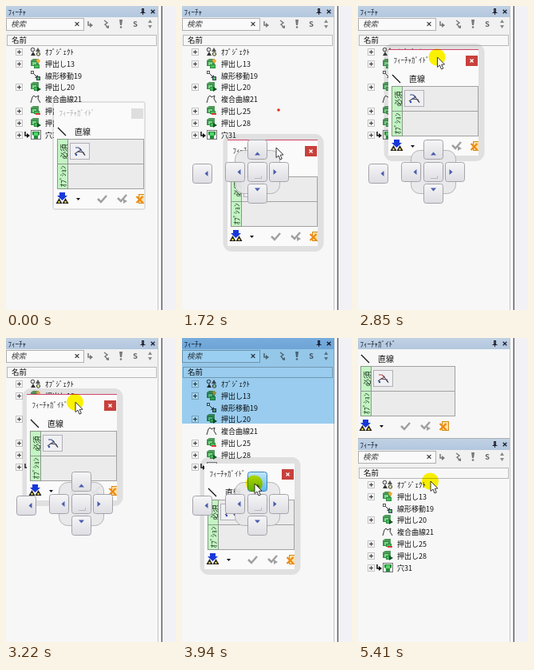
Write an HTML page with a canvas that moves like this. It is 213 px wide and 380 px high and loops after 7.17 s.

```html
<!DOCTYPE html>
<html lang="ja">
<head>
<meta charset="utf-8">
<title>フィーチャガイド</title>
<style>
html, body { margin: 0; width: 100%; height: 100%; overflow: hidden; background: #fff; }
canvas { display: block; width: 100vw; height: 100vh; }
</style>
</head>
<body>
<canvas id="stage"></canvas>
<script>
const W = 213, H = 380, LOOP = 7170;
const FONT = '"Noto Sans CJK JP", "Noto Sans CJK", sans-serif';
const PANEL = '#f7f7f7';
const canvas = document.getElementById('stage');
const c = canvas.getContext('2d');

// Pointer path: time, x, y
const POINTER = [
  [430, 222, 206], [700, 178, 166], [950, 136, 138], [1090, 122.5, 131], [1150, 121.5, 130],
  [1420, 121.5, 130], [1720, 118, 177], [2140, 118, 177], [2230, 115, 130], [2400, 115, 130],
  [2610, 111, 85], [2780, 104, 63], [3000, 90, 66], [3130, 86, 74], [3220, 87, 80],
  [3500, 88, 122], [3820, 90, 174], [3850, 90, 174], [3940, 91, 182], [5320, 91, 182], [5410, 91, 179]
];

function along(keys, t) {
  if (t <= keys[0][0]) return keys[0].slice(1);
  for (let i = 1; i < keys.length; i++) {
    const [t0, x0, y0] = keys[i - 1], [t1, x1, y1] = keys[i];
    if (t <= t1) {
      const k = (t - t0) / (t1 - t0);
      return [x0 + (x1 - x0) * k, y0 + (y1 - y0) * k];
    }
  }
  return keys[keys.length - 1].slice(1);
}

function box(x, y, w, h, fill, edge) {
  if (fill) { c.fillStyle = fill; c.fillRect(x, y, w, h); }
  if (edge) { c.strokeStyle = edge; c.lineWidth = 1; c.strokeRect(x + .5, y + .5, w - 1, h - 1); }
}

function round(x, y, w, h, r, fill, edge) {
  c.beginPath();
  c.roundRect(x, y, w, h, r);
  if (fill) { c.fillStyle = fill; c.fill(); }
  if (edge) { c.strokeStyle = edge; c.lineWidth = 1; c.stroke(); }
}

function trace(p) {
  c.beginPath();
  for (let i = 0; i < p.length; i += 2) c.lineTo(p[i], p[i + 1]);
}
function line(p, color, w = 1) {
  trace(p);
  c.strokeStyle = color; c.lineWidth = w; c.stroke();
}
function poly(p, color) {
  trace(p);
  c.fillStyle = color; c.fill();
}
function disc(x, y, r, fill, edge) {
  c.beginPath(); c.arc(x, y, r, 0, 7);
  if (fill) { c.fillStyle = fill; c.fill(); }
  if (edge) { c.strokeStyle = edge; c.lineWidth = 1; c.stroke(); }
}

function text(s, x, y, size = 9, color = '#111', style = '') {
  c.font = `${style} ${size}px ${FONT}`;
  c.textBaseline = 'middle';
  c.fillStyle = color;
  c.fillText(s, x, y);
}

function at(x, y, draw) {
  c.save(); c.translate(x, y); draw(); c.restore();
}

function multiply(draw) {
  c.globalCompositeOperation = 'multiply';
  draw();
  c.globalCompositeOperation = 'source-over';
}

function cross(x, y, r, color, w = 1.2) {
  line([x - r, y - r, x + r, y + r], color, w);
  line([x + r, y - r, x - r, y + r], color, w);
}

function titleBar(label) {
  const g = c.createLinearGradient(0, 0, 0, 14);
  g.addColorStop(0, '#c0d1e4');
  g.addColorStop(1, '#b2c7de');
  box(0, 0, 191, 14, g);
  text(label, 2.5, 7.5, 9, '#14202f');
  box(170, 3, 3, 5, '#667', '#223');
  line([168.5, 8.5, 174.5, 8.5], '#223', 1);
  line([171.5, 8, 171.5, 11], '#223', 1);
  cross(184, 7, 2.3, '#223', 1.3);
}

function extrude(mark) {
  poly([-6, -4, -3, -6, 4, -6, 4, 1, 1, 3, -6, 3], '#4f9a5a');
  box(-5, -3, 7, 6, '#7fd68a', '#2f8a42');
  if (mark === 'new') { poly([1, -5, 3, -6, 6, -4, 5, -1, 2, -1], '#f5a93a'); box(-2, 1, 7, 5, '#45c056', '#2f8a42'); }
  if (mark === 'cut') { box(-2, 0, 7, 4, '#45c056', '#2f8a42'); box(0, 3, 6, 2, '#dd3a3a'); }
  if (mark === 'add') { box(-2, 0, 6, 5, '#45c056', '#2f8a42'); poly([2, 0, 7, 3, 2, 6], '#17502c'); }
}

const ICONS = {
  object() {
    disc(-3.5, -2.5, 2.3, '#ddd', '#444');
    poly([-3, 0, 0, 5, -6, 5], '#333');
    poly([3, -5, 6, 0, 0, 0], '#555');
    disc(3.5, 3, 2.2, '#cfe0a0', '#444');
  },
  move() {
    box(-6, -6, 4, 4, '#fff', '#555');
    line([-2, -2, 2, 2], '#333');
    poly([3, -1, 3, 3, -1, 3], '#333');
    box(1, 1, 5, 5, '#55b860', '#345');
  },
  curve() { line([-6, 5, -4, -2, -2, -4, 0, -2, 4, -4, 3, 0, 6, 5], '#333'); },
  hole() {
    box(-6, -6, 13, 12, '#eee', '#777');
    poly([-4, -4, 5, -4, 5, 0, 3, 1, 3, 5, -2, 5, -2, 1, -4, 0], '#1f8f3a');
    box(-2, -3, 5, 4, '#55d56a');
  },
  new: () => extrude('new'), add: () => extrude('add'), cut: () => extrude('cut')
};

const ROWS = [
  ['ｵﾌﾞｼﾞｪｸﾄ', 'object', 1], ['押出し13', 'new', 1], ['線形移動19', 'move', 0], ['押出し20', 'add', 1],
  ['複合曲線21', 'curve', 0], ['押出し25', 'cut', 1], ['押出し28', 'add', 1], ['穴31', 'hole', 1]
];

function hook(x, y, color) {
  line([x - 2, y - 4, x - 2, y + 1, x + 1, y + 1], color, 1.5);
  poly([x, y - 2, x + 4, y + 1, x, y + 4], color);
}

function tree() {
  titleBar('ﾌｨｰﾁｬ');
  box(0, 14, 191, 22, '#f1f1f1');
  box(0, 15, 98, 16, '#fafafa', '#b0b0b0');
  text('検索', 6, 22.5, 9.5, '#444', 'italic');
  cross(89, 22.5, 2.4, '#333', 1.2);
  hook(105, 23, '#777');
  line([123, 18, 127, 21, 124, 23, 128, 27], '#777', 1.4);
  poly([125, 27, 129, 24, 129, 28], '#777');
  poly([142, 17, 146, 17, 145, 24, 143, 24], '#777');
  disc(144, 26.5, 1.3, '#777');
  text('S', 159, 22.5, 9.5, '#666', 'bold');
  poly([178, 21, 180.5, 17, 183, 21], '#888');
  poly([178, 24, 180.5, 28, 183, 24], '#888');
  box(1, 36, 188, 14, PANEL, '#b8b8b8');
  text('名前', 7, 42.5, 9.5);
  ROWS.forEach(([label, icon, open], i) => {
    const y = Math.round(57 + i * 14.8);
    if (open) {
      box(12, y - 4, 9, 9, '#fff', '#c2c2c2');
      line([14, y + .5, 19, y + .5], '#333');
      line([16.5, y - 2, 16.5, y + 3], '#333');
    }
    if (icon === 'hole') hook(26, y, '#111');
    at(37, y, ICONS[icon]);
    text(label, 49, y + .5);
  });
}

function tab(label, y, h, size) {
  box(4, y, 14, h, '#c4f3c4', '#8a9a8a');
  at(11.5, y + h / 2, () => {
    c.rotate(-Math.PI / 2);
    c.textAlign = 'center';
    text(label, 0, .5, size, '#153015');
  });
}

function tick(x, y, color) {
  line([x - 5, y, x - 1, y + 4, x + 6, y - 4], color, 2.5);
}

function guideBody(w, accent) {
  line([5, 31, 15, 41], '#111', 1.2);
  text('直線', 26, 36, 10);
  box(4, 45, w - 4, 63, '#ebebeb', '#a2a2a2');
  line([4, 76.5, w, 76.5], '#a2a2a2');
  tab('必須', 45, 32, 9.5);
  tab('ｵﾌﾟｼｮﾝ', 76, 32, 9);
  box(20, 50, 25, 21, '#f0f0f3', '#b0b0b8');
  line([27, 56, 31, 56, 34, 59, 30, 61], accent, 1.2);
  line([26, 64, 30, 61, 37, 62, 39, 66], '#445', 1.1);
  line([33, 57, 38, 65], '#445', 1);
  disc(28, 65, 1.2, '#2c49b0');
  // Preview button and confirm tools
  poly([7, 112, 14, 112, 14, 116, 17, 116, 10.5, 122, 4, 116, 7, 116], '#1738d8');
  for (const x of [6.5, 14.5]) {
    poly([x, 119, x + 4, 126, x - 4, 126], '#222');
    disc(x, 124, 1.2, '#ffe23a');
  }
  poly([28, 119, 33, 119, 30.5, 122], '#111');
  tick(60, 120, '#a0a0a0');
  tick(85, 119, '#a0a0a0');
  poly([87, 120, 92, 123, 87, 126], '#a0a0a0');
  box(106, 114, 9, 12, '#ffe0a0', '#d48a18');
  cross(107.5, 121, 4, '#ee8a12', 2.3);
}

function dialog(x, y, active, moving) {
  at(x, y, () => {
    if (active) round(-5.5, -8, 126, 147, 11, 'rgba(110,110,110,.17)');
    else round(-2, -2, 117, 136, 4, 'rgba(110,110,110,.17)');
    box(0, 0, 113, 132, '#fafafa');
    c.save();
    c.beginPath(); c.rect(0, 0, 113, 132); c.clip();
    text('ﾌｨｰﾁｬｶﾞｲﾄﾞ', 6.5, 12.5, 9, active ? '#333' : '#b0b0b0');
    box(97, 7, 15, 13, active ? '#c8403c' : '#dedede');
    if (active) cross(104.5, 13.5, 2, '#fff', 1.2);
    guideBody(113, '#3a4a8a');
    c.restore();
    if (moving) box(0, -1, 113, 1, '#d0466a');
  });
}

function dockButton(x, y, angle, hot) {
  const g = c.createLinearGradient(0, y, 0, y + 24);
  g.addColorStop(0, hot ? '#c4e8fa' : '#f6f6f8');
  g.addColorStop(1, hot ? '#62b8e8' : '#dedee3');
  round(x + .5, y + .5, 24, 24, 3, g, hot ? '#3b86b8' : '#a4a4aa');
  if (angle === null) {
    box(x + 9, y + 20, 9, 1, '#bbb');
    box(x + 17, y + 17, 1, 4, '#bbb');
  } else {
    // The arrow sits on the inner side of its button
    at(x + 12.5, y + 12.5, () => {
      c.rotate(angle);
      poly([-7, -3.5, -3, 0, -7, 3.5], '#4a5cae');
    });
  }
}

function dockGuide(hot) {
  const q = Math.PI / 2;
  round(66.5, 180.5, 56, 54, 11, 'rgba(232,232,234,.9)', '#b4b4b8');
  dockButton(82, 167, -q, hot);
  dockButton(54, 195, 2 * q);
  dockButton(82, 195, null);
  dockButton(109, 195, 0);
  dockButton(82, 222, q);
  dockButton(13, 197, 2 * q);
}

function glow(t) {
  if (t < 460) return 0;
  if (t < 1250) return 1;
  if (t < 1880) return 0;
  if (t < 4940) return Math.min(1, (t - 1850) / 120);
  return t < 5350 ? 0 : t < 5410 ? .5 : 1;
}

function pointer(x, y, halo) {
  if (halo) multiply(() => disc(x - .5, y, 10.5, `rgba(255,246,0,${halo})`));
  at(x, y, () => {
    const p = [0, 0, 0, 12.5, 3, 10, 5, 15, 7.3, 14, 5.2, 9.3, 9, 9, 0, 0];
    poly(p, '#fff');
    line(p, '#222', .9);
  });
}

function scene(t) {
  box(0, 0, W, H, PANEL);
  const docked = t >= 5000, drop = t >= 3740 && t < 4940;
  at(0, docked ? 126 : 0, tree);
  if (docked) {
    titleBar('ﾌｨｰﾁｬｶﾞｲﾄﾞ');
    at(-1, -10, () => guideBody(123, '#b04848'));
    line([0, 125.5, 191, 125.5], '#b0b0b0');
  }
  box(190, 0, 1, H, '#c4c4c4');
  box(191, 0, 4, H, '#fcfcfc');
  box(194.5, 0, 1.5, H, '#606066');
  box(196, 0, 17, H, '#f2f2f6');
  if (drop) multiply(() => box(0, 0, 191, 107, '#9ed3f6'));

  const [px, py] = along(POINTER, t);
  if (t < 4940) {
    const dx = t < 1420 ? 60 : px - 61.5;
    const dy = t < 1420 ? 121 : py - 9;
    dialog(Math.round(t > 3000 ? Math.min(dx, 28) : dx), Math.round(t > 3000 ? Math.min(dy, 157) : dy),
      t >= 60, t >= 1450 && t < 3740);
  }
  if (t >= 1480 && t < 4940) dockGuide(drop);
  if (t >= 1250 && t < 1880) disc(121, 130, 1.8, '#e8281e');
  if (t >= 460) pointer(px, py, glow(t));
}

function resize() {
  const d = window.devicePixelRatio || 1;
  canvas.width = Math.round(innerWidth * d);
  canvas.height = Math.round(innerHeight * d);
}
addEventListener('resize', resize);
resize();

const start = performance.now();
function play() {
  c.setTransform(canvas.width / W, 0, 0, canvas.height / H, 0, 0);
  scene((performance.now() - start) % LOOP);
  requestAnimationFrame(play);
}
play();
</script>
</body>
</html>
```
